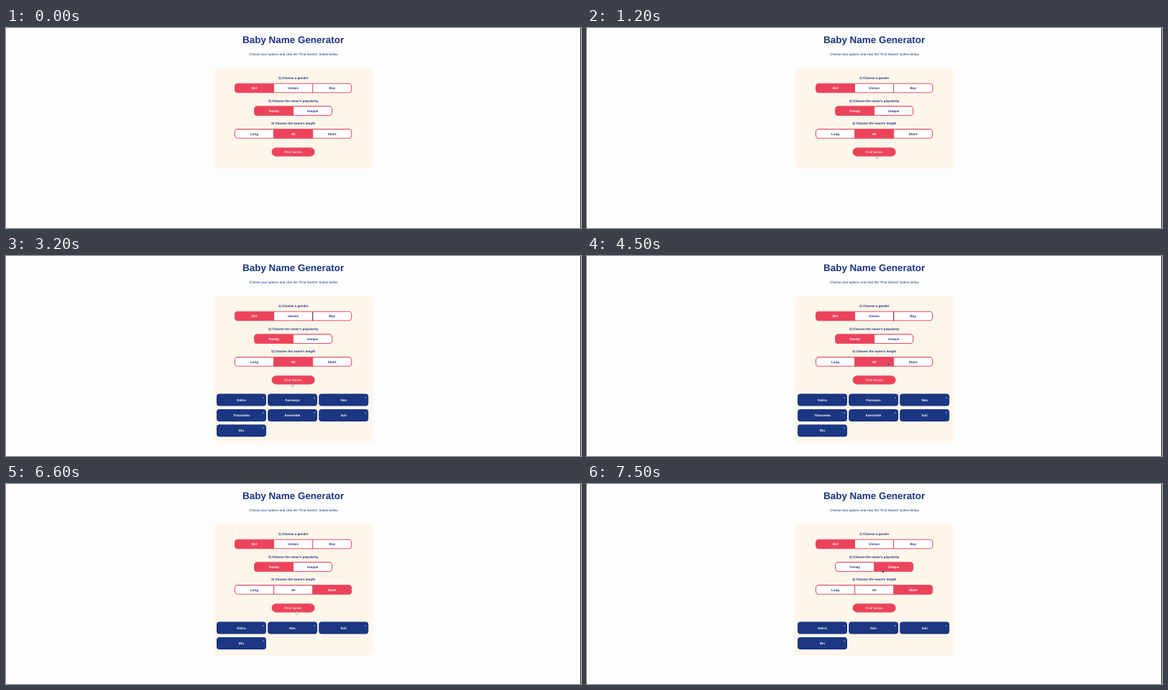
Animation, 800 px wide and 278 px high, one loop 8000 ms. Source, as an HTML page:

```html
<!DOCTYPE html>
<html lang="en">
<head>
<meta charset="utf-8">
<title>Baby Name Generator</title>
<style>
  html, body { margin: 0; width: 100%; height: 100%; overflow: hidden; background: #fdfdfe; }
  svg { display: block; width: 800px; height: 278px; }
  text {
    font: bold 4.53px "Liberation Sans", Arial, sans-serif;
    fill: #1c3580; text-anchor: middle; text-rendering: geometricPrecision;
  }
  .title { font-size: 13.45px; }
  .plain { font-weight: normal; }
  .light { fill: #fff; }
  .close { font-size: 3.4px; fill: #cfd7ee; }
  .red { fill: #ec435b; }
  .line { fill: none; stroke: #e2526a; stroke-width: 1.1; }
  .tile { fill: #1b3783; }
  .anim { animation: 8s step-end infinite; }
  .panel { animation-name: grow; }
  .early-length { animation-name: until-short; }
  .late-length { animation-name: from-short; }
  .early-fame { animation-name: until-unique; }
  .late-fame { animation-name: from-unique; }
  .first-list { animation-name: first-list; }
  .second-list { animation-name: second-list; }
  .dark-divider { animation-name: dark-divider; }
  .pointer { animation-name: move; }
  .arrow { animation-name: arrow; }
  .hand { animation-name: hand; }

  @keyframes grow { 0% { height: 139.5px } 40% { height: 203.5px } 82.5%, 100% { height: 182.5px } }
  @keyframes until-short { 0% { opacity: 1 } 68.75%, 100% { opacity: 0 } }
  @keyframes from-short { 0% { opacity: 0 } 68.75%, 100% { opacity: 1 } }
  @keyframes until-unique { 0% { opacity: 1 } 93.75%, 100% { opacity: 0 } }
  @keyframes from-unique { 0% { opacity: 0 } 93.75%, 100% { opacity: 1 } }
  @keyframes first-list { 0% { opacity: 0 } 40% { opacity: 1 } 82.5%, 100% { opacity: 0 } }
  @keyframes second-list { 0% { opacity: 0 } 82.5%, 100% { opacity: 1 } }
  @keyframes dark-divider { 0% { opacity: 0 } 27.5% { opacity: 1 } 82.5%, 100% { opacity: 0 } }
  @keyframes move {
    0%, 15% { transform: translate(402px, 176px) }
    27.5% { transform: translate(400.5px, 86.4px) }
    40% { transform: translate(397.3px, 176.4px) }
    47.5% { transform: translate(350px, 241px) }
    56.25% { transform: translate(418px, 148px) }
    68.75% { transform: translate(441.6px, 148.8px) }
    82.5% { transform: translate(402.6px, 175.4px) }
    93.75%, 100% { transform: translate(410.6px, 119px) }
  }
  @keyframes arrow {
    0% { opacity: 0 } 27.5% { opacity: 1 } 40% { opacity: 0 }
    56.25% { opacity: 1 } 82.5% { opacity: 0 } 93.75%, 100% { opacity: 1 }
  }
  @keyframes hand {
    0% { opacity: 0 } 15% { opacity: 1 } 27.5% { opacity: 0 } 40% { opacity: 1 }
    56.25% { opacity: 0 } 82.5% { opacity: 1 } 93.75%, 100% { opacity: 0 }
  }
</style>
</head>
<body>
<svg id="stage" viewBox="0 0 800 278"></svg>
<script>
const rect = (x, y, w, h, r, cls, extra = '') =>
  `<rect x="${x}" y="${y}" width="${w}" height="${h}" rx="${r}" class="${cls}" ${extra}/>`;
const text = (x, mid, str, cls = '') =>
  `<text x="${x}" y="${mid + 1.6}" class="${cls}">${str}</text>`;
const divider = (x, y, cls, extra = '') =>
  `<path d="M${x} ${y}v13" class="${cls}" ${extra}/>`;

const CELL = 54.1;

// Each option: [label, class of its selected state]
function segments(id, y, options) {
  const w = CELL * options.length;
  const x = 399.6 - w / 2;
  let base = '', active = '', lines = '';
  options.forEach(([label, state], i) => {
    const left = x + i * CELL, mid = left + CELL / 2;
    base += text(mid, y + 6.4, label);
    if (i) lines += divider(left, y, 'line');
    if (state !== undefined) {
      active += `<g class="${state}">${rect(left, y, CELL, 13, 0, 'red')}` +
        `${text(mid, y + 6.4, label, 'light')}</g>`;
    }
  });
  return `<clipPath id="${id}">${rect(x, y, w, 13, 4, '')}</clipPath>` +
    rect(x, y, w, 13, 4, '', 'fill="#fff"') + base +
    `<g clip-path="url(#${id})">${active}</g>` + lines +
    rect(x, y, w, 12.6, 4, 'line');
}

function list(cls, names) {
  const tiles = names.map((name, i) => {
    const x = 293 + (i % 3) * 71.1, y = 191.6 + Math.floor(i / 3) * 21.3;
    return rect(x, y, 69, 17, 4, 'tile') +
      text(x + 34.5, y + 8.4, name, 'light') + text(x + 65, y + 4.3, 'x', 'close');
  });
  return `<g class="anim ${cls}">${tiles.join('')}</g>`;
}

document.getElementById('stage').innerHTML = [
  '<filter id="soft" x="-5%" y="-5%" width="110%" height="110%"><feGaussianBlur stdDeviation="0.8"/></filter>',
  rect(0, 0, 800, 278, 0, '', 'fill="#fdfdfe"'),
  rect(798.9, 0, 1.1, 278, 0, '', 'fill="#3d3d42"'),
  `<text x="399.6" y="21.2" class="title">Baby Name Generator</text>`,
  text(399.7, 36, 'Choose your options and click the "Find Names" button below', 'plain'),
  rect(289, 56, 221.5, 139.5, 7, 'anim panel', 'fill="#fef6e9" filter="url(#soft)"'),
  text(399.7, 69.2, '1) Choose a gender'),
  segments('gender', 77.2, [['Girl', ''], ['Unisex'], ['Boy']]),
  divider(426.65, 77.4, 'anim dark-divider', 'stroke="#5b4560" stroke-width="1"'),
  text(399.7, 100.9, "2) Choose the name's popularity"),
  segments('fame', 108.9, [['Trendy', 'anim early-fame'], ['Unique', 'anim late-fame']]),
  text(399.7, 132.5, "3) Choose the name's length"),
  segments('length', 140.6, [['Long'], ['All', 'anim early-length'], ['Short', 'anim late-length']]),
  rect(369.6, 166.2, 60, 12.2, 6.1, 'red'),
  text(399.6, 172.2, 'Find Names', 'plain light'),
  list('first-list', ['Delira', 'Farrowyn', 'Nim', 'Tharamela', 'Evermilde', 'Suli', 'Elu']),
  list('second-list', ['Delira', 'Nim', 'Suli', 'Elu']),
  `<g class="anim pointer">
    <path class="anim arrow" d="M0 0V4.3L1 3.4 1.7 5 2.4 4.7 1.8 3.1H3.1Z"
      fill="#16161c" stroke="#fff" stroke-width=".25"/>
    <path class="anim hand" d="M.6 .4Q1.1 -.2 1.5 .4V2L3.2 2.3Q3.6 2.5 3.5 3.2L3 5H1L-.3 3.2Q-.3 2.6 .6 3Z"
      fill="#fff" stroke="#2a2a33" stroke-width=".4"/>
  </g>`
].join('');
</script>
</body>
</html>
```
